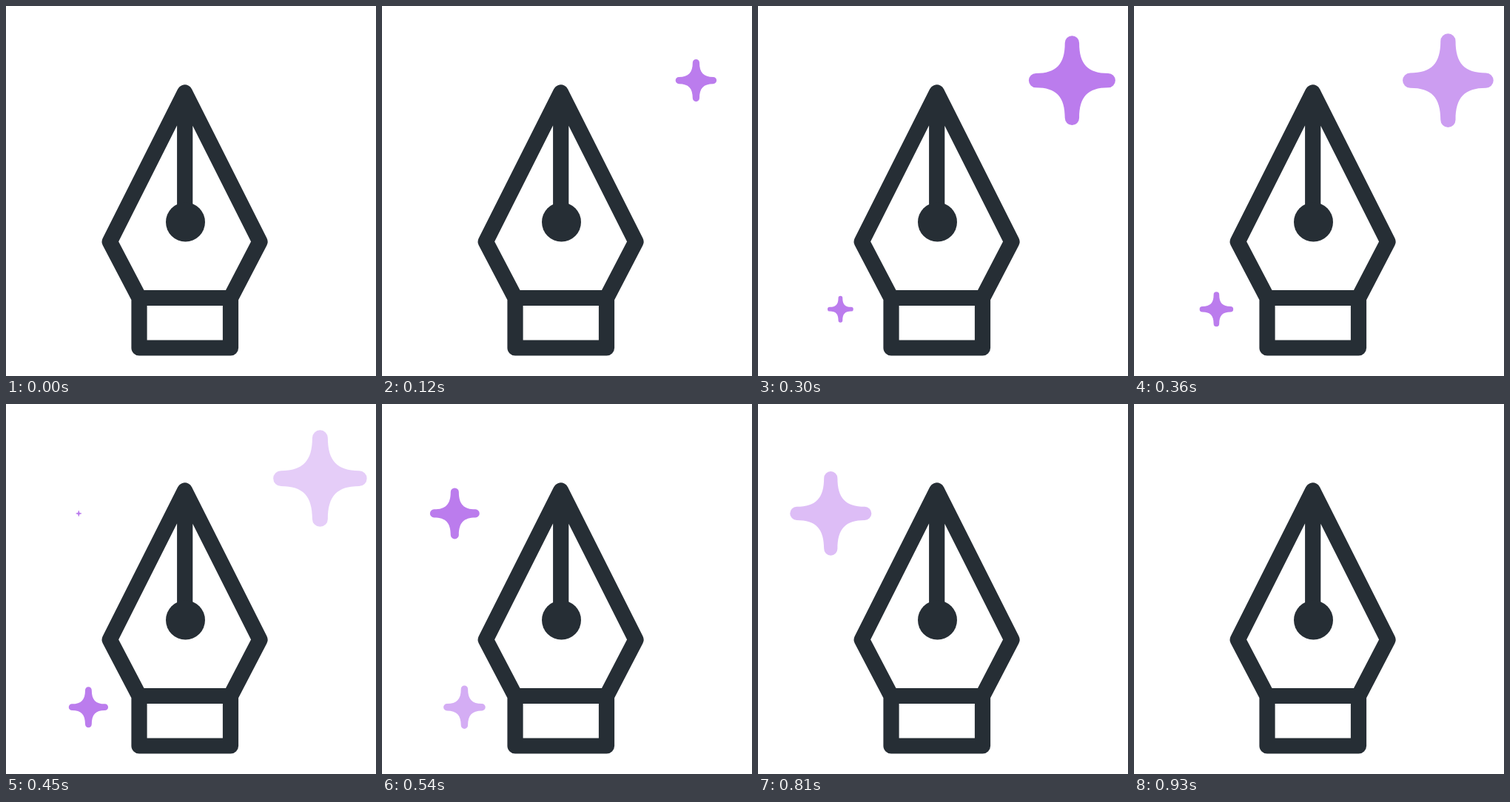
An HTML page with a canvas that plays this animation: 500x500 px, repeating every 960 ms.

```html
<!DOCTYPE html>
<html lang="en">
<head>
<meta charset="utf-8">
<title>Pen and sparkles</title>
<style>
  html, body { margin: 0; width: 100%; height: 100%; overflow: hidden; background: #fff; }
  canvas { display: block; width: 100vw; height: 100vh; }
</style>
</head>
<body>
<canvas id="stage" width="500" height="500"></canvas>
<script>
const ctx = document.getElementById('stage').getContext('2d');
const LOOP = 960, STEP = 30;
const GROW = 500, FADE_START = 300, FADE_END = 540;
const INK = '#262e35', VIOLET = '#bb7ced';

// size is the half width at full scale
const sparkles = [
  { x: 424.4, y: 100.6, size: 63.5, start: 0 },
  { x: 111.4, y: 409.7, size: 28.9, start: 150 },
  { x: 98.3, y: 147.9, size: 55.6, start: 390 }
];

const clamp = v => Math.min(1, Math.max(0, v));

// Cubic bezier easing (.34, 0, .02, 1), solved by bisection
function ease(p) {
  if (p >= 1) return 1;
  let lo = 0, hi = 1;
  for (let i = 0; i < 24; i++) {
    const u = (lo + hi) / 2, v = 1 - u;
    const x = 3 * u * v * v * 0.34 + 3 * u * u * v * 0.02 + u ** 3;
    if (x < p) lo = u; else hi = u;
  }
  return lo * lo * (3 - 2 * lo);
}

function makeSparkle() {
  const r = 10.5, armX = 53, armY = 55;
  const path = new Path2D();
  path.arc(0, -armY, r, Math.PI, 0);
  path.bezierCurveTo(r, -24, 23, -r, armX, -r);
  path.arc(armX, 0, r, -Math.PI / 2, Math.PI / 2);
  path.bezierCurveTo(23, r, r, 24, r, armY);
  path.arc(0, armY, r, 0, Math.PI);
  path.bezierCurveTo(-r, 24, -23, r, -armX, r);
  path.arc(-armX, 0, r, Math.PI / 2, Math.PI * 1.5);
  path.bezierCurveTo(-23, -r, -r, -24, -r, -armY);
  path.closePath();
  return path;
}

const sparklePath = makeSparkle();
const penPath = new Path2D(
  'M241.6 117L343 318.5L303.5 394.5H180L140.2 318.5Z' +
  'M180 394.5V462H303.5V394.5M241.7 117V285'
);

function drawPen() {
  ctx.strokeStyle = ctx.fillStyle = INK;
  ctx.lineWidth = 21.2;
  ctx.lineJoin = ctx.lineCap = 'round';
  ctx.stroke(penPath);
  ctx.beginPath();
  ctx.arc(242.5, 292, 26.5, 0, Math.PI * 2);
  ctx.fill();
}

function drawSparkle({ x, y, size, start }, time) {
  const age = time - start;
  if (age <= 0 || age >= FADE_END) return;
  const scale = ease(age / GROW) * size / 63.5;
  ctx.save();
  ctx.globalAlpha = clamp((FADE_END - age) / (FADE_END - FADE_START));
  ctx.fillStyle = VIOLET;
  ctx.translate(x, y);
  ctx.scale(scale, scale);
  ctx.fill(sparklePath);
  ctx.restore();
}

function render() {
  const time = Math.floor((performance.now() % LOOP) / STEP) * STEP;
  ctx.fillStyle = '#fff';
  ctx.fillRect(0, 0, 500, 500);
  drawPen();
  sparkles.forEach(s => drawSparkle(s, time));
  requestAnimationFrame(render);
}
render();
</script>
</body>
</html>
```
